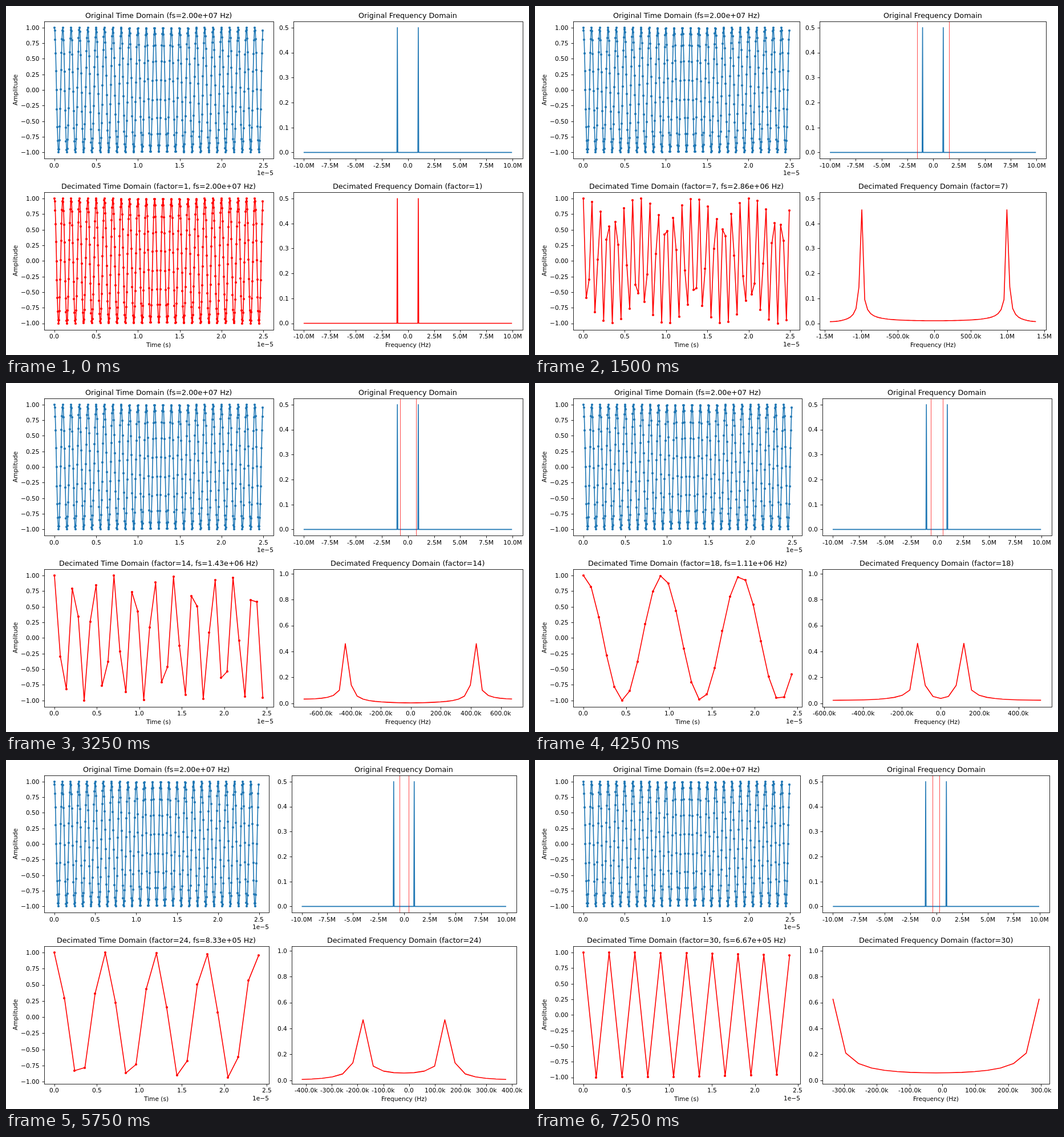
Recreate the animation shown at these times as an HTML page with a canvas. Size 917 px wide and 611 px high, loop 7500 ms.

```html
<!DOCTYPE html>
<html>
<head>
<meta charset="utf-8">
<style>
html, body { margin: 0; width: 100%; height: 100%; overflow: hidden; background: #fff; }
canvas { display: block; }
</style>
</head>
<body>
<canvas id="stage" width="917" height="611"></canvas>
<script>
const ctx = document.getElementById('stage').getContext('2d');
const PT = 917 / 12 / 72;               // pixels per point
const FS = 2e7, SAMPLES = 499, STEPS = 30, STEP_MS = 250;
const LEFT = 66.65, RIGHT = 905.5, GAP = 35.05, HEIGHT = 240.4, TOPS = [26.9, 326.1];
const BLUE = '#1f77b4', RED = '#ff0000', TICK = 4;

const font = pt => `${pt * PT}px "DejaVu Sans", sans-serif`;
const snap = v => Math.round(v) + 0.5;
const minus = s => s.replace('-', '\u2212');
const formatTime = v => v.toFixed(1);
const formatAmp = v => minus(v.toFixed(2));
const formatMag = v => minus(v.toFixed(1));
const formatFreq = v => {
  const a = Math.abs(v);
  return a >= 1e6 ? (v / 1e6).toFixed(1) + 'M' : a >= 1e3 ? (v / 1e3).toFixed(1) + 'k' : v.toFixed(1);
};

function autoLimits(values) {
  const lo = Math.min(...values), hi = Math.max(...values), pad = (hi - lo) * 0.05;
  return [lo - pad, hi + pad];
}

function ticks([lo, hi]) {
  const raw = (hi - lo) / 9, scale = 10 ** Math.floor(Math.log10(raw));
  const step = scale * [1, 2, 2.5, 5, 10].find(s => s * scale >= raw * (1 - 1e-9));
  const out = [];
  for (let i = Math.ceil(lo / step); i * step <= hi; i++) out.push(i * step);
  return out;
}

// Centred magnitude spectrum, normalised by length
function spectrum(x) {
  const n = x.length;
  return x.map((_, i) => {
    const k = i - Math.floor(n / 2);
    let re = 0, im = 0;
    x.forEach((v, j) => {
      const a = 2 * Math.PI * k * j / n;
      re += v * Math.cos(a);
      im -= v * Math.sin(a);
    });
    return Math.hypot(re, im) / n;
  });
}

// Time is in units of 1e-5 s
function analyse(factor) {
  const time = [], amp = [], fs = FS / factor;
  for (let i = 0; i < SAMPLES; i += factor) {
    time.push(2.5 * i / SAMPLES);
    amp.push(Math.cos(2 * Math.PI * 25 * i / SAMPLES));
  }
  const freq = time.map((_, i) => -fs / 2 + i * fs / time.length);
  const mag = spectrum(amp);
  return {
    factor, fs, time, amp, freq, mag,
    timeLim: autoLimits(time), ampLim: autoLimits(amp), freqLim: autoLimits(freq)
  };
}

// How far the last tick label reaches past the right edge of its axes
function overhang(lim, format, width) {
  const last = ticks(lim).pop();
  const room = (lim[1] - last) / (lim[1] - lim[0]) * width;
  return Math.max(0, ctx.measureText(format(last)).width / 2 - room);
}

const states = Array.from({ length: STEPS }, (_, i) => analyse(i + 1));
const base = states[0];
let magLim = [-0.025, 0.525], axesWidth = (RIGHT - LEFT - GAP) / 2;
ctx.font = font(10);
for (const s of states) {
  const peak = Math.max(...s.mag);
  if (peak > magLim[1]) magLim = [magLim[0], peak * 1.05];
  s.magLim = magLim;
  const over = (a, b, format) =>
    Math.max(overhang(a, format, axesWidth), overhang(b, format, axesWidth));
  const gap = GAP + over(base.timeLim, s.timeLim, formatTime);
  const right = RIGHT - over(base.freqLim, s.freqLim, formatFreq);
  s.width = axesWidth = (right - LEFT - gap) / 2;
  s.rightX = right - axesWidth;
}

// Text starts on whole pixels; align is 0 left, 0.5 centre, 1 right
function text(str, x, y, align, pt = 10) {
  ctx.font = font(pt);
  ctx.fillText(str, Math.round(x - align * ctx.measureText(str).width), Math.round(y));
}

function segment(x1, y1, x2, y2) {
  ctx.beginPath();
  ctx.moveTo(x1, y1);
  ctx.lineTo(x2, y2);
  ctx.stroke();
}

function plot({ x, y, w, xs, ys, xlim, ylim, xformat, yformat, color, title, xlabel, ylabel, dots, marks = [] }) {
  const h = HEIGHT, bottom = y + h;
  const px = v => x + (v - xlim[0]) / (xlim[1] - xlim[0]) * w;
  const py = v => bottom - (v - ylim[0]) / (ylim[1] - ylim[0]) * h;
  const x0 = snap(x), y0 = snap(y), x1 = snap(x + w), y1 = snap(bottom);

  ctx.save();
  ctx.beginPath();
  ctx.rect(x0 - 0.5, y0 - 0.5, x1 - x0, y1 - y0);
  ctx.clip();
  ctx.strokeStyle = ctx.fillStyle = color;
  ctx.lineWidth = 1.5 * PT;
  ctx.lineJoin = 'round';
  ctx.beginPath();
  xs.forEach((v, i) => ctx.lineTo(px(v), py(ys[i])));
  ctx.stroke();
  if (dots) xs.forEach((v, i) => {
    ctx.beginPath();
    ctx.arc(Math.round(px(v)), Math.round(py(ys[i])), 2 * PT, 0, 2 * Math.PI);
    ctx.fill();
  });
  ctx.strokeStyle = RED;
  ctx.globalAlpha = 0.7;
  ctx.lineWidth = 1;
  for (const m of marks) segment(snap(px(m)), y0 - 0.5, snap(px(m)), y1);
  ctx.restore();

  ctx.strokeStyle = ctx.fillStyle = '#000';
  ctx.lineWidth = 0.8 * PT;
  ctx.strokeRect(x0, y0, x1 - x0, y1 - y0);
  for (const t of ticks(xlim)) {
    segment(snap(px(t)), y1, snap(px(t)), y1 + TICK);
    text(xformat(t), px(t), bottom + 15.6, 0.5);
  }
  for (const t of ticks(ylim)) {
    segment(x0 - TICK, snap(py(t)), x0, snap(py(t)));
    text(yformat(t), x - 7.8, py(t) + 3.9, 1);
  }
  text(title, x + w / 2, y - 6 * PT, 0.5, 12);
  if (xlabel) text(xlabel, x + w / 2, bottom + 30.6, 0.5);
  if (ylabel) {
    text('1e\u22125', x + w, bottom + 29.1, 1);
    ctx.save();
    ctx.translate(20, Math.round(y + h / 2));
    ctx.rotate(-Math.PI / 2);
    text(ylabel, 0, 0, 0.5);
    ctx.restore();
  }
}

function drawRow(row, s, view, color, name, timeNote, freqNote, marks) {
  const y = TOPS[row], w = view.width;
  const hz = s.fs.toExponential(2).replace('+', '+0');
  plot({
    x: LEFT, y, w, color, xs: s.time, ys: s.amp, xlim: s.timeLim, ylim: s.ampLim,
    xformat: formatTime, yformat: formatAmp, dots: true,
    title: `${name} Time Domain (${timeNote}fs=${hz} Hz)`,
    xlabel: row && 'Time (s)', ylabel: 'Amplitude'
  });
  plot({
    x: view.rightX, y, w, color, xs: s.freq, ys: s.mag, xlim: s.freqLim, ylim: s.magLim,
    xformat: formatFreq, yformat: formatMag, marks,
    title: `${name} Frequency Domain${freqNote}`, xlabel: row && 'Frequency (Hz)'
  });
}

let shown = -1;
function render() {
  const index = Math.floor(performance.now() / STEP_MS) % STEPS;
  if (index !== shown) {
    shown = index;
    const s = states[index];
    ctx.fillStyle = '#fff';
    ctx.fillRect(0, 0, 917, 611);
    drawRow(0, base, s, BLUE, 'Original', '', '', index ? s.freqLim : []);
    drawRow(1, s, s, RED, 'Decimated', `factor=${s.factor}, `, ` (factor=${s.factor})`);
  }
  requestAnimationFrame(render);
}
render();
</script>
</body>
</html>
```
